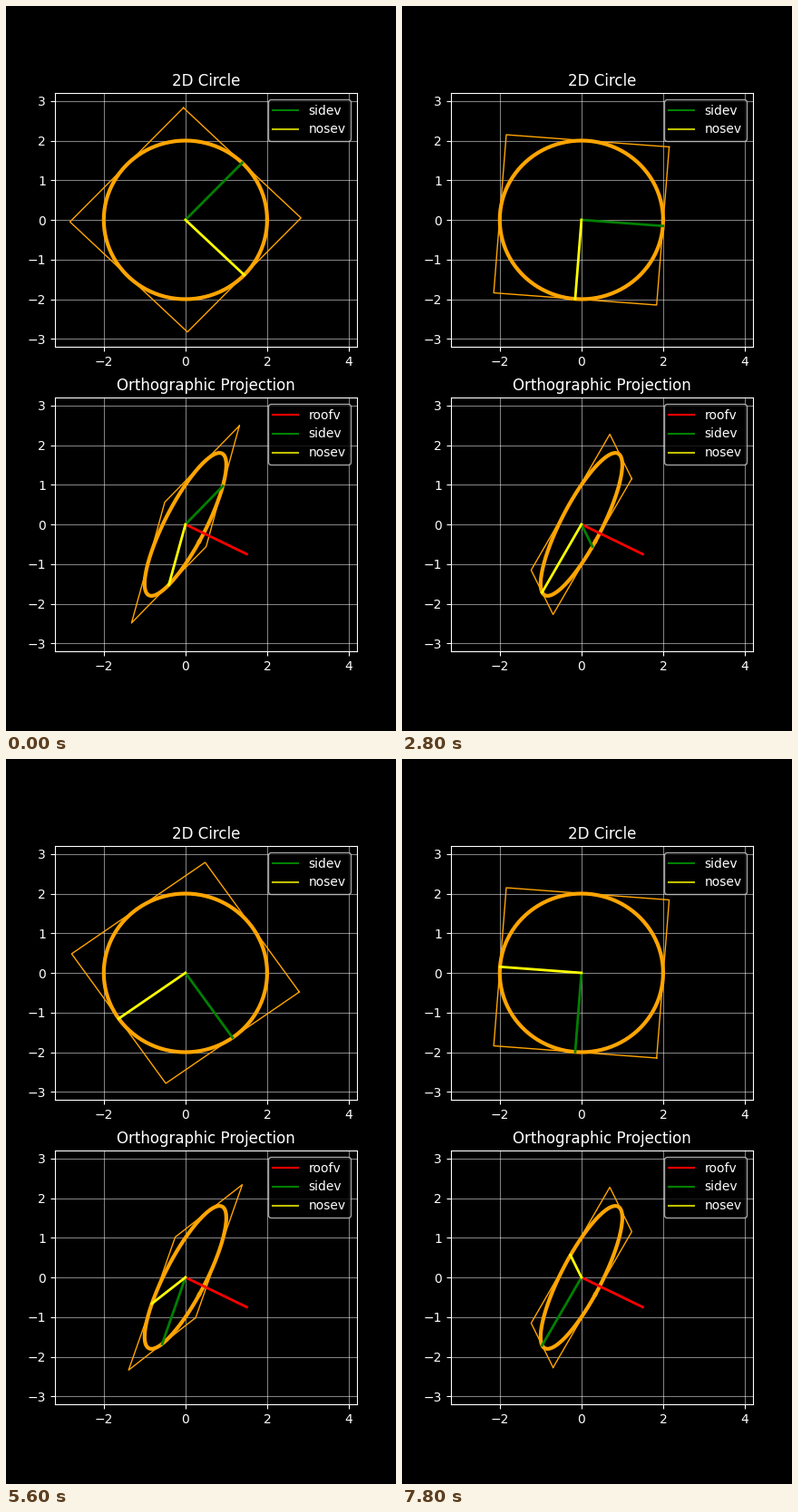
These frames come from a looping animation (430x800 px, 8 s). A matplotlib script:

```python
import numpy as np
import matplotlib.pyplot as plt
from matplotlib.animation import FuncAnimation
from matplotlib.lines import Line2D

FRAMES, INTERVAL = 40, 200
START, STEP = 46.0, 3.6          # degrees, degrees per frame
RADIUS = 2.0
LEGEND_COLORS = {"roofv": "r", "sidev": "g", "nosev": "y"}


def euler(ax, ay, az):
    """Rotation matrix Rx(ax) @ Ry(ay) @ Rz(az), angles in degrees."""
    ax, ay, az = np.radians([ax, ay, az])
    rx = np.array([[1, 0, 0],
                   [0, np.cos(ax), -np.sin(ax)],
                   [0, np.sin(ax), np.cos(ax)]])
    ry = np.array([[np.cos(ay), 0, np.sin(ay)],
                   [0, 1, 0],
                   [-np.sin(ay), 0, np.cos(ay)]])
    rz = np.array([[np.cos(az), -np.sin(az), 0],
                   [np.sin(az), np.cos(az), 0],
                   [0, 0, 1]])
    return rx @ ry @ rz


ORIENT = euler(60, 60, -70)
FLAT = np.eye(2)
TILTED = ORIENT[:2, :2]          # wheel plane seen along the z axis
ROOF = np.sqrt(3) * ORIENT[:2, 2]


def polar(radius, degrees):
    a = np.radians(degrees)
    return radius * np.array([np.cos(a), np.sin(a)])


class View:
    """One panel with the wheel, its bounding square and direction vectors."""

    def __init__(self, ax, title, matrix, labels):
        self.matrix = matrix
        ax.set(title=title, xlim=(-3.2, 4.2), ylim=(-3.2, 3.2),
               xticks=range(-2, 5, 2), yticks=range(-3, 4))
        ax.grid(alpha=0.5)
        handles = [Line2D([], [], color=LEGEND_COLORS[name]) for name in labels]
        ax.legend(handles, labels, loc="upper right")

        circle = matrix @ polar(RADIUS, np.linspace(0, 360, 201))
        ax.plot(*circle, color="orange", lw=3)
        self.square, = ax.plot([], [], color="orange", lw=1)
        if "roofv" in labels:
            ax.plot([0, ROOF[0]], [0, ROOF[1]], color="red", lw=2)
        self.side, = ax.plot([], [], color="green", lw=2)
        self.nose, = ax.plot([], [], color="yellow", lw=2)

    def turn(self, angle):
        corners = angle + 45 + 90 * np.arange(5)
        self.square.set_data(*(self.matrix @ polar(RADIUS * np.sqrt(2), corners)))
        for line, heading in ((self.side, angle), (self.nose, angle - 90)):
            x, y = self.matrix @ polar(RADIUS, heading)
            line.set_data([0, x], [0, y])
        return [self.square, self.side, self.nose]


plt.style.use("dark_background")
fig, (top, bottom) = plt.subplots(2, 1, figsize=(4.3, 8), dpi=100)
views = [
    View(top, "2D Circle", FLAT, ["sidev", "nosev"]),
    View(bottom, "Orthographic Projection", TILTED, ["roofv", "sidev", "nosev"]),
]


def update(frame):
    angle = START - STEP * frame
    return [artist for view in views for artist in view.turn(angle)]


anim = FuncAnimation(fig, update, frames=FRAMES, interval=INTERVAL,
                     repeat=True, repeat_delay=0)
plt.show()
```
